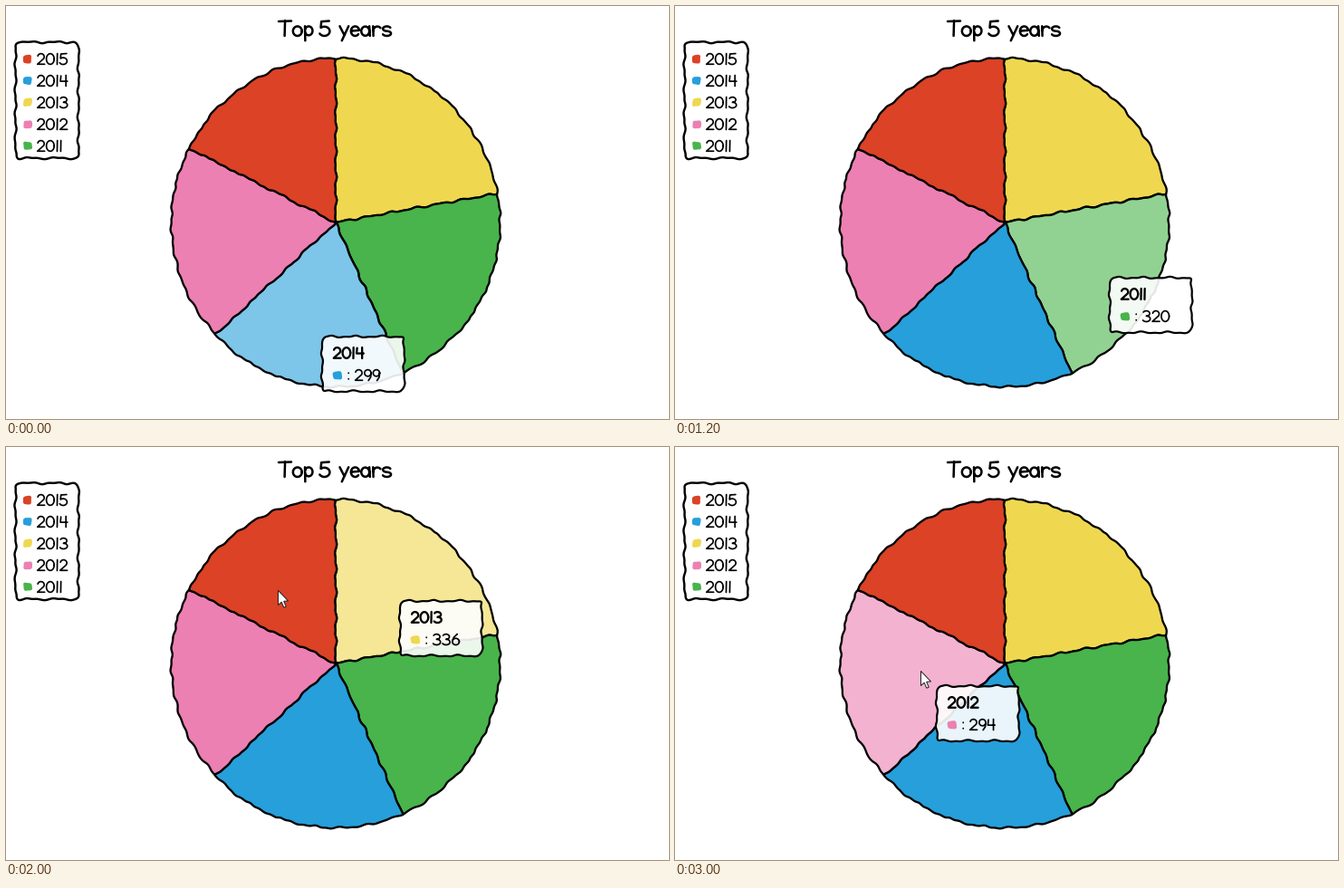
A matplotlib script that plays this animation: 732x456 px, repeating every 3270 ms.

```python
import numpy as np
import matplotlib.pyplot as plt
from matplotlib.animation import FuncAnimation
from matplotlib.colors import to_rgba
from matplotlib.patches import Polygon

W, H, DPI = 732, 456, 96
PX = 72 / DPI
LOOP, TICK = 3270, 30
STEP = 200 / 3          # the picture advances at 15 steps per second
LAST = 3000
LEAD = 130              # the pointer runs ahead of the tooltip
POINTER_FROM = 1300

COLORS = {"2015": "#db4226", "2014": "#269fdb", "2013": "#efd850",
          "2012": "#ec80b2", "2011": "#48b44b"}
VALUES = {"2013": 336, "2011": 320, "2014": 299, "2012": 294, "2015": 266}
YEARS = list(VALUES)
CENTER, RADIUS = np.array([364, 239]), 181.5
EDGES = np.cumsum([0, *VALUES.values()]) / sum(VALUES.values()) * 360


# --- hand-drawn lettering: strokes in units of the cap height, y up ---

def arc(cx, cy, rx, ry, a0, a1):
    a = np.radians(np.linspace(a0, a1, 24))
    return np.column_stack([cx + rx * np.cos(a), cy + ry * np.sin(a)])


def line(*pts):
    return np.array(pts, float)


def join(*parts):
    return np.vstack(parts)


DIGITS = {
    "0": (.92, [arc(.37, .5, .36, .49, 0, 360)]),
    "1": (.33, [line((.1, 1), (.08, 0))]),
    "2": (.83, [join(arc(.34, .7, .3, .29, 165, -40), line((.02, .02), (.68, .02)))]),
    "3": (.87, [join(arc(.33, .75, .31, .24, 150, -90), arc(.33, .26, .36, .26, 90, -150))]),
    "4": (.8, [line((.1, .95), (.05, .45), (.7, .45)), line((.56, 1), (.56, 0))]),
    "5": (.85, [join(line((.62, 1), (.1, .96), (.06, .56)), arc(.3, .31, .36, .31, 130, -150))]),
    "6": (.79, [arc(.36, .3, .32, .3, 0, 360), line((.04, .33), (.18, .7), (.5, 1))]),
    "9": (.79, [arc(.34, .69, .3, .3, 0, 360), line((.64, .7), (.6, .3), (.4, 0))]),
    ":": (.25, [line((.1, .7), (.1, .67)), line((.1, .16), (.1, .13))]),
    " ": (.45, []),
}
LETTERS = {
    "T": (.92, [line((0, .97), (.85, 1)), line((.43, 1), (.4, 0))]),
    "o": (.79, [arc(.34, .32, .3, .32, 0, 360)]),
    "p": (.6, [line((.05, .65), (.07, -.32)), arc(.3, .34, .26, .3, 160, -160)]),
    "y": (.74, [line((.03, .65), (.32, .08)), line((.62, .65), (.17, -.32))]),
    "e": (.7, [join(line((.06, .33), (.58, .37)), arc(.32, .32, .28, .32, 12, 320))]),
    "a": (.76, [arc(.3, .32, .27, .31, 0, 360), line((.57, .65), (.61, 0))]),
    "r": (.66, [line((.06, .65), (.08, 0)), arc(.35, .35, .27, .28, 180, 40)]),
    "s": (.65, [join(arc(.32, .48, .26, .16, 25, 270), arc(.32, .16, .28, .16, 90, -160))]),
}
GLYPHS = DIGITS | LETTERS


def lettering(text, h):
    """Pen strokes of a line of text, baseline start at the origin, y down."""
    x, out = 0, []
    for ch in text:
        adv, strokes = GLYPHS[ch]
        for s in strokes:
            out += [(s + (x, 0)) * (h, -h), [[np.nan, np.nan]]]
        x += adv
    return np.vstack(out)


# --- wobbly outlines ---

def dense(pts, step=1.5):
    pts = np.vstack([pts, pts[:1]])
    d = np.r_[0, np.cumsum(np.hypot(*np.diff(pts, axis=0).T))]
    s = np.linspace(0, d[-1], max(int(d[-1] / step), 8))
    return np.column_stack([np.interp(s, d, pts[:, k]) for k in (0, 1)])


def wobble(pts, amp=1.0):
    x, y = pts.T
    dx = .75 * np.sin(.23 * y + .09 * x + 1) + .45 * np.sin(.47 * y - .21 * x + 2)
    dy = .75 * np.sin(.22 * x - .1 * y + 3) + .45 * np.sin(.45 * x + .23 * y)
    return pts + amp * np.column_stack([dx, dy])


def sketch_box(x, y, w, h, r, amp=1.0):
    corners = [(x + w - r, y + h - r, 0), (x + r, y + h - r, 90),
               (x + r, y + r, 180), (x + w - r, y + r, 270)]
    return wobble(dense(join(*[arc(cx, cy, r, r, a, a + 90) for cx, cy, a in corners])), amp)


def slice_shape(a0, a1):
    a = np.radians(np.linspace(a0, a1, 90))
    rim = CENTER + RADIUS * np.column_stack([np.sin(a), -np.cos(a)])
    return wobble(dense(join(CENTER[None], rim)))


# --- pointer motion ---

def smooth(u):
    return u * u * (3 - 2 * u)


def ease_out(u):
    return np.sin(u * np.pi / 2)


STOPS = np.array([(331.5, 348), (467.5, 297.5), (417.5, 153.5),
                  (300.5, 158.5), (271.5, 247.5)])
MOVES = [(0, 730, ease_out), (1130, 1485, smooth), (2000, 2130, smooth), (2640, 2860, smooth)]
TIP_OFFSET = np.array([17.5, 17])


def mouse(t):
    pos = STOPS[0]
    for (t0, t1, ease), a, b in zip(MOVES, STOPS, STOPS[1:]):
        if t >= t0:
            pos = a + (b - a) * ease(min((t - t0) / (t1 - t0), 1))
    return pos


def year_at(pos):
    dx, dy = pos - CENTER
    angle = np.degrees(np.arctan2(dx, -dy)) % 360
    return YEARS[np.searchsorted(EDGES, angle) - 1]


# --- stage ---

fig = plt.figure(figsize=(W / DPI, H / DPI), dpi=DPI, facecolor="white")
ax = fig.add_axes([0, 0, 1, 1])
ax.set(xlim=(0, W), ylim=(H, 0))
ax.axis("off")


def shape(pts, fill, z, lw=0.0, edge="black"):
    p = Polygon(pts, closed=True, facecolor=fill, edgecolor=edge if lw else "none",
                lw=lw * PX, joinstyle="round", zorder=z)
    return ax.add_patch(p)


def pen(pts, lw, z):
    return ax.plot(*pts.T, color="black", lw=lw * PX, zorder=z,
                   solid_capstyle="round", solid_joinstyle="round")[0]


slices = {y: shape(slice_shape(a0, a1), COLORS[y], 1, 2.3)
          for y, a0, a1 in zip(YEARS, EDGES, EDGES[1:])}

pen(lettering("Top 5 years", 16.5) + (301, 33), 2.5, 2)

shape(sketch_box(10.5, 40, 69.5, 128, 4), "white", 2, 2.4)
for row, (year, color) in enumerate(COLORS.items()):
    y = 58.5 + 24 * row
    shape(sketch_box(19, y - 4.5, 9.5, 9, 2.5, .6), color, 3)
    pen(lettering(year, 12) + (34.5, y + 6), 1.7, 3)

BOX = sketch_box(0, 0, 90.5, 60.5, 4)
SWATCH = sketch_box(12, 38.5, 10, 8.5, 2.5, .6)
HEADS = {y: lettering(y, 12) + (12.5, 24) for y in YEARS}
COUNTS = {y: lettering(f": {v}", 12) + (28, 48.5) for y, v in VALUES.items()}
ARROW = line((0, 0), (0, 16), (3.7, 12.7), (6.3, 18.7), (8.7, 17.7), (6.2, 11.8), (11, 11.4))

box = shape(BOX, (1, 1, 1, .9), 5, 2.2)
swatch = shape(SWATCH, "white", 6)
head = pen(HEADS["2014"], 2.3, 6)
count = pen(COUNTS["2014"], 1.7, 6)
arrow = shape(ARROW, "white", 8, 1, "#222222")
ax.set(xlim=(0, W), ylim=(H, 0))


def draw(i):
    t = min(round(i * TICK / STEP) * STEP, LAST)
    pos = mouse(t)
    year = year_at(pos)
    for y, patch in slices.items():
        patch.set_facecolor(to_rgba(COLORS[y], .6 if y == year else 1))
    at = np.round(pos + TIP_OFFSET)
    box.set_xy(BOX + at)
    swatch.set_xy(SWATCH + at)
    swatch.set_facecolor(COLORS[year])
    head.set_data(*(HEADS[year] + at).T)
    count.set_data(*(COUNTS[year] + at).T)
    arrow.set_xy(ARROW + mouse(t + LEAD))
    arrow.set_visible(t > POINTER_FROM)
    return [*slices.values(), box, swatch, head, count, arrow]


anim = FuncAnimation(fig, draw, frames=LOOP // TICK, interval=TICK,
                     repeat=True, repeat_delay=0, blit=False)
plt.show()
```
